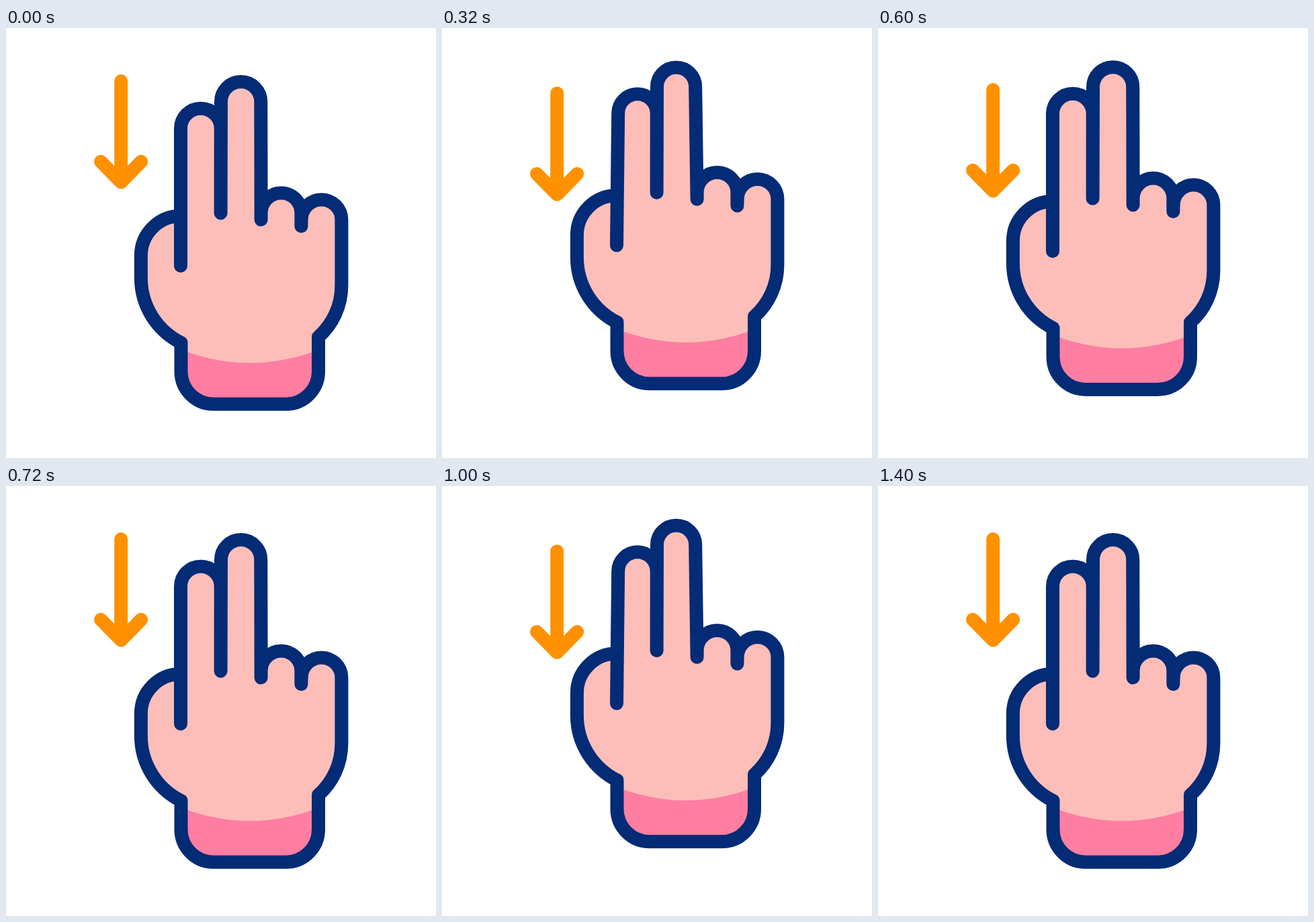
Recreate the animation shown at these times as an HTML page with a canvas. Size 640x640 px, loop 1480 ms.

```html
<!DOCTYPE html>
<html lang="en">
<head>
<meta charset="utf-8">
<title>Two-finger swipe down</title>
<style>
  html, body { margin: 0; width: 100%; height: 100%; overflow: hidden; background: #fff; }
  canvas { display: block; width: 640px; height: 640px; }
</style>
</head>
<body>
<canvas id="stage" width="640" height="640"></canvas>
<script>
const ctx = document.getElementById('stage').getContext('2d');
const NAVY = '#042b76', SKIN = '#fdbeb9', PINK = '#ff7ea2', ORANGE = '#ff9100';
const LOOP = 1480, STEP = 40, START = 40, SWIPE = 680, UP = 440, BEND_PEAK = 240;
const RISE = 43.6, ARROW_DROP = 26;

const ease = x => {
  x = Math.min(1, Math.max(0, x));
  return x * x * (3 - 2 * x);
};
// Rises from 0 to 1 at the peak, then falls back to 0 at the end.
const hump = (u, peak, end) => u < peak ? ease(u / peak) : ease((end - u) / (end - peak));

function poseAt(time) {
  const u = Math.floor(time / STEP) * STEP - START;
  if (u <= 0 || u >= 2 * SWIPE) return { lift: 0, bend: 0 };
  const v = u % SWIPE;
  return { lift: hump(v, UP, SWIPE), bend: hump(v, BEND_PEAK, UP) };
}

// Clockwise half circle over the top, from x0 to x1.
function fingertip(path, x0, x1, y) {
  path.arc((x0 + x1) / 2, y, (x1 - x0) / 2, Math.PI, 0);
}

function outline(bend) {
  const p = new Path2D();
  const dip = 9 * bend, pinch = 2.4 * bend;
  p.moveTo(260, 354);
  fingertip(p, 260 + pinch, 319.7, 149.5 + dip);
  p.lineTo(319.6, 275.5);
  fingertip(p, 320, 379.3 - pinch, 109.7 + dip);
  p.lineTo(379.6, 285.3);
  fingertip(p, 379.6, 439.4, 275.3);
  p.lineTo(439.4, 295);
  fingertip(p, 439.6, 499.4, 285.3);
  p.lineTo(499.4, 383);
  p.bezierCurveTo(499.4, 414, 486, 441, 465, 460);
  p.lineTo(465, 511);
  p.arc(416.5, 511.3, 48.5, 0, Math.PI / 2);
  p.arc(309, 511.3, 48.5, Math.PI / 2, Math.PI);
  p.lineTo(260.5, 468.5);
  p.bezierCurveTo(224, 450, 200.9, 413, 200.9, 372);
  p.arc(259.9, 338.8, 59, Math.PI, Math.PI * 1.5);
  return p;
}

const cuff = new Path2D('M261 479Q363 518 465 479V560H261Z');
const arrow = new Path2D('M171.2 79V229.5M141 198.8L171.2 229.5L201.2 198.8');

function stroke(path, color) {
  ctx.strokeStyle = color;
  ctx.lineWidth = 20;
  ctx.lineCap = ctx.lineJoin = 'round';
  ctx.stroke(path);
}

function shifted(dy, paint) {
  ctx.save();
  ctx.translate(0, dy);
  paint();
  ctx.restore();
}

function draw(time) {
  const { lift, bend } = poseAt(time);
  ctx.fillStyle = '#fff';
  ctx.fillRect(0, 0, 640, 640);

  shifted(ARROW_DROP * lift, () => stroke(arrow, ORANGE));

  shifted(-RISE * lift, () => {
    const hand = outline(bend);
    ctx.fillStyle = SKIN;
    ctx.fill(hand);
    ctx.save();
    ctx.clip(hand);
    ctx.fillStyle = PINK;
    ctx.fill(cuff);
    ctx.restore();
    stroke(hand, NAVY);
  });
}

const begin = performance.now();
function tick() {
  draw((performance.now() - begin) % LOOP);
  requestAnimationFrame(tick);
}
tick();
</script>
</body>
</html>
```
